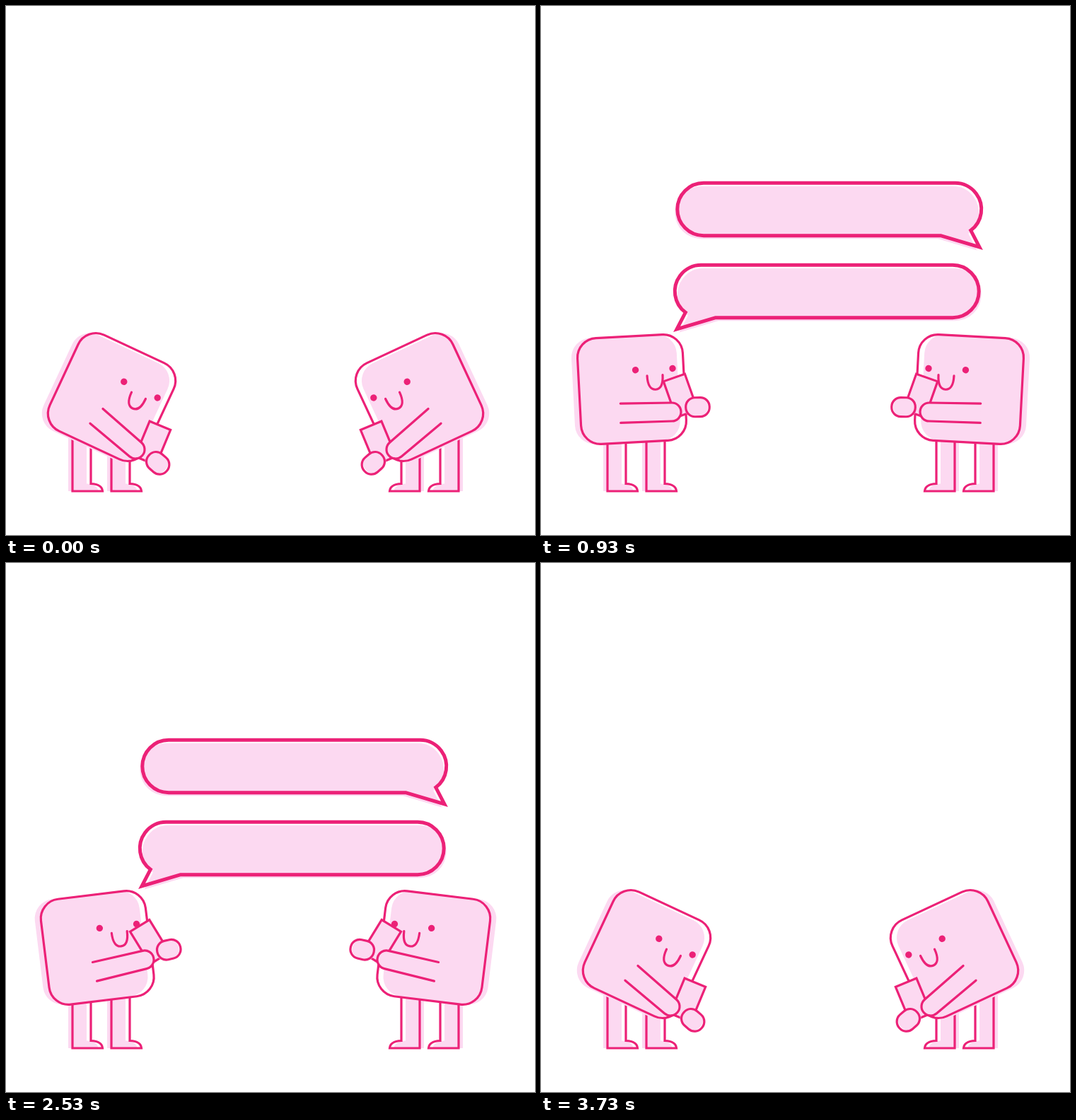
An HTML page with a canvas that plays this animation: 748 px wide and 748 px high, repeating every 5.74 s.

```html
<!DOCTYPE html>
<html lang="en">
<head>
<meta charset="utf-8">
<title>Two friends chatting</title>
<style>
html, body { margin: 0; width: 100%; height: 100%; overflow: hidden; background: #fff; }
canvas { display: block; width: 748px; height: 748px; }
</style>
</head>
<body>
<canvas id="stage" width="748" height="748"></canvas>
<script>
const ctx = document.getElementById('stage').getContext('2d');
const LOOP = 5740, LAST = 37, MIRROR = 734;
const PINK = '#fcd9f1', LINE = '#ec2177';

// Key poses: body x, y, angle, then arm x, y, angle
const CROUCH = [149.5, 553, 25, 183, 627, 41];
const POSES = [
  { k: 0, pose: CROUCH },
  { k: 4, pose: [139, 543.5, -11, 208, 562, -12] },
  { k: 9, pose: [128.5, 542, -3, 185, 574, -1] },
  { k: 13, pose: [128, 545.3, -10, 175, 565, -13] },
  { k: 19, pose: [127.5, 546.5, -13, 182, 560, -17] },
  { k: 25, pose: [129.2, 544, -7, 196, 561, -13] },
  { k: 32, pose: [129.5, 541, 0, 173.5, 579, 3.7] },
  { k: LAST, pose: CROUCH }
];

const clamp = v => Math.min(1, Math.max(0, v));
const smooth = u => u * u * (3 - 2 * u);
const curve = u => Math.pow(clamp(u), 1.95);

function poseAt(k) {
  const i = Math.max(1, POSES.findIndex(p => k <= p.k));
  const a = POSES[i - 1], b = POSES[i];
  const u = smooth((k - a.k) / (b.k - a.k));
  return a.pose.map((v, j) => v + (b.pose[j] - v) * u);
}

// Bubbles swing up from their tail while growing and swing back while shrinking.
function popAt(k, from, span, tilt) {
  const missing = curve(1 - (k - from) / span);
  const gone = curve((k - 30) / 3.4);
  return { size: clamp(1 - missing - gone), angle: 76 * missing + tilt * gone };
}

function at(x, y, deg, scale, draw) {
  ctx.save();
  ctx.translate(x, y);
  ctx.rotate(deg * Math.PI / 180);
  ctx.scale(scale, scale);
  draw();
  ctx.restore();
}

function shape(build) {
  const p = new Path2D();
  build(p);
  return p;
}

const box = (w, h, r) => shape(p => p.roundRect(-w / 2, -h / 2, w, h, r));

const BODY = box(149, 150, 27.5);
const HAND = box(33.5, 27, 13);
const PHONE = box(32, 54, 0);
const MOUTH = new Path2D('M22.5-18C22.5-4 27 2 33.5 2S44.5-4 44.5-18');
const LEG = new Path2D('M0 600V686H42.5C42 680 37 676 26 675.5V600');
const ARM = shape(p => {
  p.moveTo(-72.5, -13.2);
  p.arc(0, 0, 13, -Math.PI / 2, Math.PI / 2);
  p.lineTo(-72.5, 14.2);
});
const BUBBLE = shape(p => {
  const y = -53.5, r = 37.2;
  p.moveTo(-55, y + r);
  p.lineTo(0, 0);
  p.arc(-34.5, y, r, .93, -Math.PI / 2, true);
  p.arc(-390, y, r, -Math.PI / 2, Math.PI / 2, true);
  p.closePath();
});

function fill(path, color, dx = 0, dy = 0) {
  ctx.save();
  ctx.translate(dx, dy);
  ctx.fillStyle = color;
  ctx.fill(path);
  ctx.restore();
}

function ink(path, width = 3.2) {
  ctx.lineWidth = width;
  ctx.strokeStyle = LINE;
  ctx.stroke(path);
}

function dot(x, y) {
  ctx.fillStyle = LINE;
  ctx.beginPath();
  ctx.arc(x, y, 4.7, 0, 7);
  ctx.fill();
}

// Misregistered print: the colour sits sideways of its outline.
function body(x, y, deg) {
  at(x, y, deg, 1, () => fill(BODY, '#fff'));
  at(x - 8.6, y, deg, 1, () => fill(BODY, PINK));
  at(x, y, deg, 1, () => {
    ink(BODY);
    dot(6.5, -27);
    dot(59, -26.5);
    ctx.lineCap = 'round';
    ink(MOUTH);
  });
}

function arm() {
  at(12.7, -22.8, -18.5, 1, () => { fill(PHONE, PINK); ink(PHONE); });
  fill(ARM, PINK);
  ctx.lineCap = 'round';
  ink(ARM);
  at(36.6, -6.2, 0, 1, () => {
    fill(HAND, '#fff');
    fill(HAND, PINK, -2.5);
    ink(HAND);
  });
}

function figure([bx, by, ba, ax, ay, aa]) {
  for (const x of [94, 149]) at(x, 0, 0, 1, () => { fill(LEG, PINK, -6); ink(LEG); });
  body(bx, by, ba);
  at(ax, ay, aa, 1, arm);
}

function flipped(draw) {
  ctx.save();
  ctx.translate(MIRROR, 0);
  ctx.scale(-1, 1);
  draw();
  ctx.restore();
}

function bubble(x, y, { size, angle }) {
  if (!size) return;
  at(x, y, angle, size, () => {
    fill(BUBBLE, PINK, -3.5, 4.5);
    ink(BUBBLE, 5);
  });
}

// Steps alternate between 130 and 70 ms.
function stepAt(ms) {
  const pair = Math.floor(ms / 200);
  return Math.min(LAST, pair * 2 + (ms - pair * 200 >= 130 ? 1 : 0));
}

function render(k) {
  ctx.fillStyle = '#fff';
  ctx.fillRect(0, 0, 748, 748);
  const pose = poseAt(k);
  figure(pose);
  flipped(() => figure(pose));
  // The reply pushes the first bubble upwards as it arrives.
  const push = 95 * (1 - curve(1 - (k - 5) / 4));
  bubble(620, 436 - push, popAt(k, 1, 5, 28));
  flipped(() => bubble(MIRROR - 192, 457, popAt(k, 5, 4, 42)));
}

const start = performance.now();
function tick() {
  render(stepAt((performance.now() - start) % LOOP));
  requestAnimationFrame(tick);
}
tick();
</script>
</body>
</html>
```
